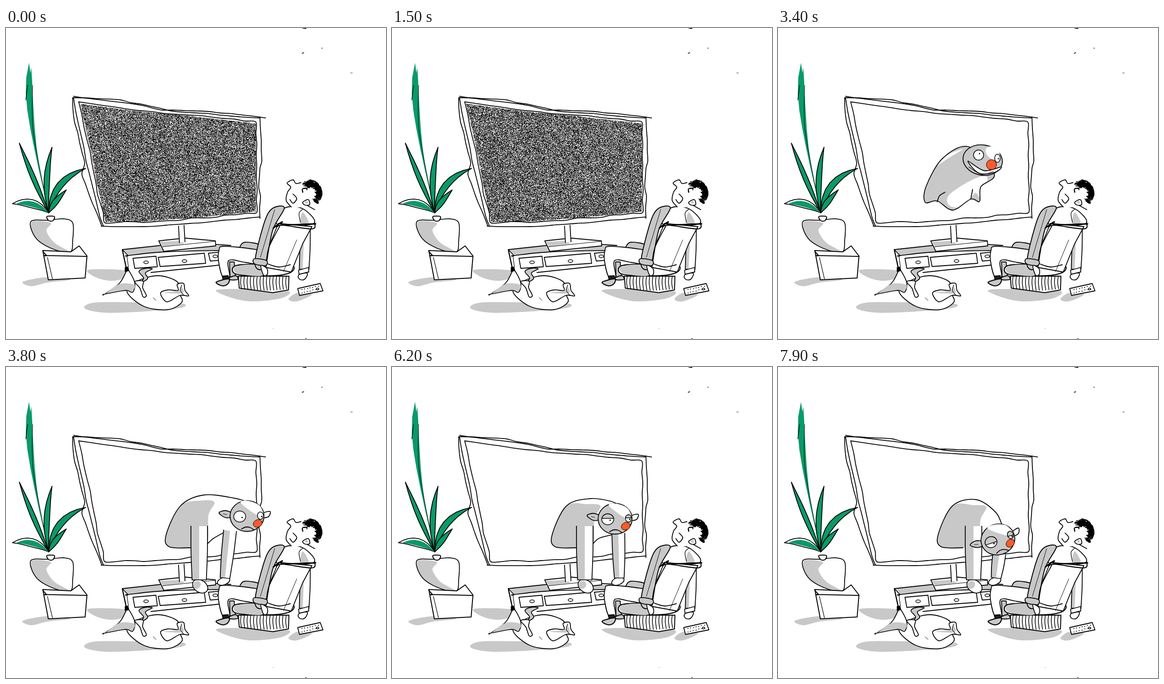
Animation, 826 px wide and 678 px high, one loop 8 s. Source, as an HTML page with a canvas:

```html
<!DOCTYPE html>
<html lang="en">
<head>
<meta charset="utf-8">
<title>Out of the screen</title>
<style>
html, body { margin: 0; width: 100%; height: 100%; overflow: hidden; background: #fff; }
canvas, svg { position: absolute; left: 0; top: 0; width: 826px; height: 678px; }
path, ellipse { stroke-linecap: round; stroke-linejoin: round; vector-effect: non-scaling-stroke; }
</style>
</head>
<body>
<canvas id="snow" width="826" height="678"></canvas>
<svg viewBox="0 0 826 678"><g id="room"></g><g id="guest"></g></svg>
<script>
const GREY = '#c8c8c8', GREEN = '#0a9a67', ORANGE = '#ff5a2a', LOOP = 8000;
const clamp = (v, lo, hi) => Math.max(lo, Math.min(hi, v));
const lerp = (a, b, k) => a + (b - a) * k;

function random(seed) {
  return () => {
    seed = seed + 0x6D2B79F5 | 0;
    let t = Math.imul(seed ^ seed >>> 15, 1 | seed);
    t = t + Math.imul(t ^ t >>> 7, 61 | t) ^ t;
    return ((t ^ t >>> 14) >>> 0) / 4294967296;
  };
}

// Points are written "x,y x,y" or given as pairs.
const pairs = p => typeof p === 'string' ? p.split(' ').map(s => s.split(',').map(Number)) : p;

function curve(points, closed) {
  const p = pairs(points), n = p.length;
  const at = i => closed ? p[(i + n) % n] : p[clamp(i, 0, n - 1)];
  let d = 'M' + p[0];
  for (let i = 0; i < (closed ? n : n - 1); i++) {
    const [a, b, c, e] = [at(i - 1), at(i), at(i + 1), at(i + 2)];
    const c1 = b.map((v, k) => v + (c[k] - a[k]) / 6), c2 = c.map((v, k) => v - (e[k] - b[k]) / 6);
    d += `C${c1} ${c2} ${c}`;
  }
  return d + (closed ? 'Z' : '');
}

const draw = (d, fill, w) =>
  `<path d="${d}" fill="${fill}" stroke="${w ? '#000' : 'none'}" stroke-width="${w}"/>`;
const ink = (p, w = 1.8) => draw(curve(p), 'none', w);
const blob = (p, fill = '#fff', w = 1.8) => draw(curve(p, true), fill, w);
const shade = p => blob(p, GREY, 0);
const poly = (p, fill = '#fff', w = 1.8) => draw('M' + pairs(p).join('L') + 'Z', fill, w);
const oval = (x, y, rx, ry, fill = '#fff', w = 1.5, turn = 0) =>
  `<ellipse cx="${x}" cy="${y}" rx="${rx}" ry="${ry}" fill="${fill}" stroke="${w ? '#000' : 'none'}" stroke-width="${w}" transform="rotate(${turn} ${x} ${y})"/>`;
const dot = (x, y, r = 1.4) => oval(x, y, r, r, '#000', 0);

// Unsteady hand: splits every stretch and nudges the new points.
function wobble(points, amount, seed) {
  const rnd = random(seed), p = pairs(points), out = [p[0]];
  for (let i = 1; i < p.length; i++) {
    const [a, b] = [p[i - 1], p[i]], n = Math.ceil(Math.hypot(b[0] - a[0], b[1] - a[1]) / 28);
    for (let k = 1; k <= n; k++)
      out.push([0, 1].map(j => lerp(a[j], b[j], k / n) + (k < n ? (rnd() - .5) * amount : 0)));
  }
  return out;
}

// Tapered limb, shaded on its left side.
function limb(x0, y0, x1, y1, w0, w1, tone = .5) {
  const len = Math.hypot(x1 - x0, y1 - y0), nx = (y0 - y1) / len, ny = (x1 - x0) / len;
  const side = s => [0, .5, 1].map(t => {
    const off = s * (lerp(w0, w1, t) / 2 + Math.sin(Math.PI * t));
    return [lerp(x0, x1, t) + nx * off, lerp(y0, y1, t) + ny * off];
  });
  const left = side(1), right = side(-1), strip = other => [...left, ...other.reverse()];
  return poly(strip(side(-1)), '#fff', 0) + poly(strip(side(1 - 2 * tone)), GREY, 0) +
    ink(left) + ink(right) + ink([left[2], right[2]], 1.3);
}

// Leaf from the pot to a tip, widest at u = .5 ** (1 / peak).
function leaf(tx, ty, cx, cy, width, peak = 1, fill = GREEN, line = 1.8) {
  const x = u => (1 - u) ** 2 * 93 + 2 * u * (1 - u) * cx + u * u * tx;
  const y = u => (1 - u) ** 2 * 403 + 2 * u * (1 - u) * cy + u * u * ty;
  const edge = s => [...Array(9).keys()].map(i => {
    const u = i / 8, dx = x(u + .01) - x(u - .01), dy = y(u + .01) - y(u - .01);
    const off = s * width * Math.sin(Math.PI * u ** peak) / Math.hypot(dx, dy);
    return [x(u) - dy * off, y(u) + dx * off];
  });
  return poly(curvePoints(edge(1), edge(-1)), fill, line);
}
const curvePoints = (a, b) => [...a, ...b.reverse()];

function plant() {
  const pot = '54,422 93,419 125,416 145,425 145,462 139,489 100,481 65,458';
  return shade('37,553 92,543 140,549 90,555 55,563') +
    leaf(50, 76, 44, 200, 7.5, 2.2, GREEN, 0) + leaf(55, 86, 46, 205, 4, 2.8, GREEN, 0) +
    ink('47,125 43,157', 1.2) + ink('58,125 57,185 62,245 92,400', 1) +
    leaf(29, 251, 58, 327, 5) + leaf(100, 260, 81, 330, 6) + leaf(173, 306, 103, 330, 7) +
    leaf(131, 353, 102, 382, 6) + leaf(14, 383, 58, 373, 9, 1, '#fff') + leaf(21, 384, 58, 375, 6, 1, GREEN, 0) +
    blob(pot, '#fff', 0) + shade('56,423 97,425 88,442 105,468 138,488 100,481 65,458') + blob(pot, 'none') +
    blob('89,411 105,411 102,420 93,420', '#fff', 2) +
    poly('80,485 141,488 159,475 176,497 172,545 92,549', '#fff', 2) +
    ink('80,487 88,496 88,496 176,498', 2) + ink('90,500 101,547', 1.2);
}

function television() {
  const edges = [
    ['147,149 280,166 340,179 440,182 564,196', 2], ['145,152 250,157 360,181 552,196', 2],
    ['145,152 149,205 171,295 165,318 187,380 208,431', 3], ['147,153 174,290 200,395 212,432', 3],
    ['207,432 300,433 400,426 552,412', 2], ['552,194 556,290 551,322 552,415', 4],
    ['158,161 290,180 400,190 543,205 545,300 545,402 430,414 300,424 214,424 196,340 183,270 158,161', 4]
  ];
  return shade('180,527 262,529 254,546 225,551 192,542') +
    edges.map(([p, amount], i) => ink(wobble(p, amount, i + 5))).join('');
}

function cabinet() {
  const drawer = (x, y, w, h) => poly([[x, y], [x + w, y - w * .09], [x + w + 3, y + h - w * .07], [x + 4, y + h]]) +
    oval(x + w * .57, y + h * .4, 5, 3);
  return poly('253,484 335,474 488,473 470,485 464,517 315,533 262,525', '#fff', 0) +
    poly('256,483 335,475 343,487 265,495', GREY, 0) + poly('456,475 488,474 470,484 380,487', GREY, 0) +
    ink('253,483 337,474', 2) + ink('456,472 489,474') + ink('253,483 265,496 265,496 345,488 472,485') +
    ink('253,484 262,526', 2.4) + ink('263,497 266,521', 1.2) + ink('315,533 463,517') +
    drawer(276, 502, 50, 22) + drawer(331, 500, 100, 20) + drawer(440, 491, 26, 17) +
    poly('332,464 389,458 455,464 456,475 343,487') + poly('335,466 377,464 389,470 341,477', GREY, 0) +
    ink('340,477 454,465', 1.2) +
    poly('375,432 387,430 389,466 377,468', '#fff', 0) + ink('375,432 377,468') + ink('387,430 389,466');
}

function dog() {
  const body = '263,575 285,552 330,540 372,553 378,580 382,598 352,614 300,607';
  return shade('172,612 190,599 270,598 380,600 370,612 230,621') +
    blob(body, '#fff', 0) + shade('263,575 296,568 318,572 342,596 382,598 352,613 300,607') + blob(body) +
    blob('336,578 352,571 374,572 372,559 386,557 389,572 397,584 378,583 350,597') +
    shade('342,577 374,573 381,563 384,578') + ink('382,560 379,572 386,582', 1.2) + ink('320,588 326,594', 1) +
    blob('262,530 247,556 215,580 215,580 260,572 275,576 280,556 267,529') +
    shade('247,558 217,579 217,579 260,571 274,574 279,560') +
    blob('289,531 302,524 318,525 303,534 308,546 292,556 299,545', GREY) +
    blob('280,553 298,552 297,566 305,583 298,586 291,567') +
    poly('259,522 265,521 267,529 259,531', '#000', 1.5);
}

function hair() {
  const rnd = random(7);
  let out = '';
  for (let i = 0; i < 100; i++) {
    const a = lerp(-2.5, 1.1, rnd()), r = .55 + rnd() * .35;
    const x = 662 + Math.cos(a) * 18 * r, y = 361 + Math.sin(a) * 24 * r;
    out += ink([[x, y], [x + 3 + Math.cos(a) * 5, y + Math.sin(a) * 5], [x + Math.cos(a - .4) * 9, y + Math.sin(a - .4) * 9]], 2);
  }
  return out;
}

function remote() {
  const rnd = random(3);
  let out = shade('614,591 634,577 665,581 632,596') + poly('634,568 683,557 689,573 638,583');
  for (let i = 0; i < 14; i++) {
    const u = i % 7 * 6;
    out += dot(642 + u + rnd() * 2, 570 - u * .22 + (i > 6) * 6 + rnd() * 2, 1.1);
  }
  return out + oval(677, 569, 2.5, 2);
}

function legs() {
  const leg = '463,485 472,476 530,481 552,488 552,514 520,511 484,507 486,542 471,542 462,508';
  return blob('510,474 520,467 550,472 550,485 512,482', GREY) +
    poly('486,510 496,510 499,545 487,545', GREY) + blob('486,544 500,540 504,548 488,549', GREY, 2) +
    blob(leg, '#fff', 0) + shade('465,487 484,480 477,500 545,512 484,507 485,541 472,541') + blob(leg) +
    poly('470,541 483,540 484,547 472,549', '#222') + blob('457,554 484,547 482,558 470,562', GREY, 2.2);
}

function chair() {
  let out = poly('505,541 615,541 614,571 580,577 507,567', '#fff', 2);
  for (let x = 511; x < 613; x += 7) out += ink([[x, 542], [x - 1, 555], [x + 1, 568 + 4 * Math.sin((x - 505) / 35)]], 1.5);
  return out + blob('497,519 540,515 618,516 620,532 580,540 502,537', '#fff', 2.2) +
    shade('499,520 545,517 556,540 503,535') +
    poly('592,426 665,433 645,470 620,532 565,522 572,475') +
    blob('541,513 559,432 577,395 605,392 580,440 562,520', GREY, 2) +
    ink('595,432 571,480 565,521') + ink('584,396 553,500', 1) + ink('632,462 603,531', 1) + ink('568,514 592,521 618,516') +
    ink('581,436 600,423 603,429 673,427', 3) + ink('588,434 602,430 665,438 671,425', 2.2) +
    blob('540,503 566,507 564,518 540,514', GREY) + blob('554,518 560,539 568,537 567,524');
}

function man() {
  return shade('456,573 510,569 612,573 595,590 520,595') + remote() + legs() +
    blob('605,393 645,394 669,426 590,428') + shade('645,402 658,425 640,426') + ink('645,395 637,404 640,424', 1.3) +
    blob('640,535 635,543 641,549 650,547 655,535') + limb(652, 436, 648, 526, 19, 21, .35) +
    poly('636,528 658,522 658,532 637,537') + chair() +
    blob('620,390 609,376 612,358 619,347 611,338 626,332 643,338 668,355 667,396 645,391', '#fff', 0) +
    ink('620,390 609,376 612,358 619,347 611,338 624,331 630,339 641,337') +
    ink('624,362 632,372 624,382 617,374') + ink('644,352 645,358', 2.4) + ink('655,387 671,396') + hair() +
    blob('657,374 645,380 650,386 660,385') + oval(653, 380, 3, 3, GREY, 0);
}

const specks = () => ink('645,0 652,1') + ink('644,55 647,54') + dot(687, 44, 1) + ink('749,98 753,98', .8) +
  dot(581, 655, .6) + dot(652, 677, 1);

// The grinning creature on the screen, fitted into a box.
function walker(x, y, w, h) {
  const body = '415,259 358,284 322,345 320,380 346,377 380,397 419,373 438,378 441,346 470,318';
  return `<g transform="translate(${x} ${y}) scale(${w / 171} ${h / 143}) translate(-317 -254)">` +
    blob(body, GREY, 0) + blob('344,301 366,278 402,264 370,284', '#fff', 0) +
    blob('374,388 372,364 424,330 455,326 441,368 428,360 406,388', '#fff', 0) + blob(body, 'none') +
    ink('346,379 351,366 363,358') + ink('419,373 423,352') +
    oval(445, 288, 43, 33, GREY, 1.8, 10) + oval(467, 273, 18, 12, '#fff', 0, 42) +
    oval(436, 277, 11, 11) + dot(438, 274) + oval(477, 284, 6, 9) + dot(479, 285) +
    blob('413,290 448,311 485,303 470,315 436,316') + ink('415,303 442,319 468,313', 1.2) +
    oval(464, 298, 11, 11, ORANGE, 1) + '</g>';
}

function eye(x, y, rx, ry, lid) {
  const k = 2 * lid - 1, w = rx * Math.sqrt(1 - k * k), cy = y + k * ry;
  return oval(x, y, rx, ry) + dot(x + rx * .4, Math.max(y + 2, cy + 2.5), 1.6) +
    (lid ? draw(`M${x - w} ${cy}A${rx} ${ry} 0 ${+(lid > .5)} 1 ${x + w} ${cy}Z`, GREY, 1.5) : '');
}

const head = ({ x, y, turn, lid }) => `<g transform="translate(${x} ${y}) rotate(${turn})">` +
  blob('-34,-7 -48,-12 -61,-7 -48,3 -35,2', GREY) + ink('-52,-5 -44,-3', 1) + blob('34,-6 50,-10 47,1 36,3') +
  oval(0, 0, 37, 33.5, GREY, 1.8) + blob('-14,-30 4,-33 28,-22 36,3 12,-8', '#fff', 0) +
  eye(-16, 1, 13, 12, lid) + eye(29, -1, 6.5, 8, lid) +
  ink('-12,28 -3,24 7,25 15,30') + oval(23, 16, 10, 8, ORANGE, 1, -25) + '</g>';

// The creature hanging out of the set; body and arms follow the head.
function hanger(pose) {
  const { x, y, crown, near, far, reach } = pose, back = [x + 10, y - 28];
  const hump = [[402, 394], [355, 392], [348, 366], [379, 303], [430, crown],
    [(430 + back[0]) / 2 + 14, (crown + back[1]) / 2 - 2], back];
  const belly = [[near + 18, 385], [near + 32, 373], [far - 5, y + 34]];
  return blob([...hump, ...pairs(belly).slice().reverse()], '#fff', 0) +
    shade([...hump.slice(0, 4), [425, crown + 12], [453, crown + 16], [440, crown + 45], [437, 385]]) +
    ink(hump) + ink(belly) +
    oval(reach - 3, 467, 14, 8, '#fff', 1.8, -20) + limb(far + 5, y + 32, reach, 460, 28, 21) +
    oval(near + 2, 478, 18, 13, '#fff', 1.8, 35) + oval(near - 5, 475, 8, 9, GREY, 0, 35) +
    limb(near, 347, near, 464, 36, 31) + head(pose);
}

const alert = { x: 490, y: 330, turn: 0, lid: 0, crown: 279, near: 420, far: 482, reach: 476 };
const weary = { x: 485, y: 331, turn: 0, lid: .42, crown: 287, near: 419, far: 487, reach: 494 };
const asleep = { x: 478, y: 376, turn: -18, lid: .6, crown: 289, near: 425, far: 476, reach: 474 };
const doze = k => Object.fromEntries(Object.keys(weary).map(key => [key, lerp(weary[key], asleep[key], k)]));
const peer = (dx, dy) => ({ ...alert, x: alert.x + dx, y: alert.y + dy });
const speck = i => oval(417 + i, 300 - i, 3.5 + 2.6 * i, 3 + 2.5 * i);

const scenes = [
  ...[0, 500, 1000, 1500].map(t => [t, 'snow']),
  ...[0, 1, 2].map(i => [2000 + 100 * i, speck(i)]),
  [2400, walker(405, 283, 30, 29)], [2700, walker(345, 268, 100, 65)], [2800, walker(308, 248, 162, 98)],
  [3200, walker(302, 250, 172, 138)], [3400, walker(317, 254, 171, 143)], [3500, walker(345, 290, 328, 273)],
  [3600, hanger(peer(14, -8))], [3800, hanger(peer(34, -5))],
  [4700, hanger(peer(38, 2))], [4800, hanger(peer(16, 2))], [4900, hanger(alert)],
  [6200, hanger(weary)], [7600, hanger(doze(.2))], [7800, hanger(doze(.65))], [7900, hanger(asleep)]
];

const guest = document.getElementById('guest');
const pen = document.getElementById('snow').getContext('2d');
document.getElementById('room').innerHTML = plant() + television() + cabinet() + dog() + man() + specks();

const glass = new Path2D('M161 165L290 182L400 192L543 208L543 400L430 412L300 422L216 423L198 340L185 270Z');
function snow(seed) {
  const rnd = random(seed * 977), image = pen.createImageData(390, 264);
  for (let i = 0; i < image.data.length; i += 4) {
    image.data.fill(clamp(((rnd() - .58) * 2 + .5) * 255, 0, 255), i, i + 3);
    image.data[i + 3] = 255;
  }
  pen.putImageData(image, 158, 162);
  pen.globalCompositeOperation = 'destination-in';
  pen.fill(glass);
  pen.globalCompositeOperation = 'source-over';
}

let shown = -1;
function render(t) {
  const i = scenes.findLastIndex(s => s[0] <= t);
  if (i === shown) return;
  shown = i;
  const art = scenes[i][1];
  pen.clearRect(0, 0, 826, 678);
  if (art === 'snow') snow(i + 1);
  guest.innerHTML = art === 'snow' ? '' : art;
}

const start = performance.now();
function tick() {
  render((performance.now() - start) % LOOP);
  requestAnimationFrame(tick);
}
tick();
</script>
</body>
</html>
```
